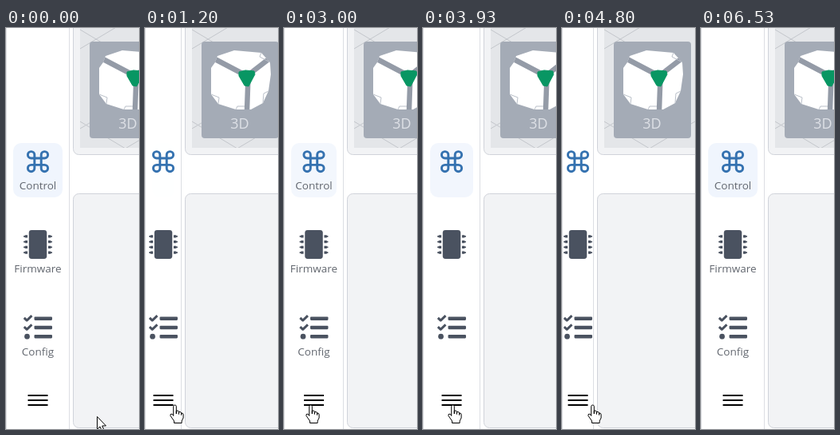
Write an HTML page that moves like this. It is 167 px wide and 502 px high and loops after 7.07 s.

```html
<!DOCTYPE html>
<html lang="en">
<head>
<meta charset="utf-8">
<title>Collapsing sidebar</title>
<style>
html, body { margin: 0; width: 100%; height: 100%; overflow: hidden; background: #fff; }
svg { display: block; width: 167px; height: 502px; }
text { font-family: "Open Sans", "Noto Sans", sans-serif; text-anchor: middle; }
#labels { font-size: 13.5px; fill: #62676f; }
.panel { fill: #f2f3f5; stroke: #d0d3da; }
.cursor { fill: #fff; stroke: #000; stroke-linejoin: round; }
</style>
</head>
<body>
<svg viewBox="0 0 167 502">
  <defs>
    <clipPath id="viewer"><rect x="13" y="-5" width="200" height="155"/></clipPath>
    <path id="cube" d="M45 35L66 28L100 31L111 43L112 58L109 79L102 94L87 102L68 102L46 95L37 83L37 50L42 43Z"/>
    <clipPath id="cubeClip"><use href="#cube"/></clipPath>
    <g id="pins">
      <path id="pin" d="M440 88h42q6 0 6 6v6h18q6 0 6 6v12q0 6-6 6h-18v6q0 6-6 6h-42z"/>
      <use href="#pin" y="96"/><use href="#pin" y="192"/><use href="#pin" y="288"/>
    </g>
  </defs>

  <path d="M.5 0V502" stroke="#e3e4e7"/>
  <rect id="highlight" x="9" y="144" height="68" rx="10" fill="#f0f5fd"/>

  <g id="menu">
    <g transform="translate(-16.8 150.400) scale(1.4)" fill="none" stroke="#3572b0" stroke-width="2.1">
      <path d="M18 3a3 3 0 0 0-3 3v12a3 3 0 1 0 3-3H6a3 3 0 1 0 3 3V6a3 3 0 1 0-3 3h12a3 3 0 0 0 0-6"/>
    </g>
    <g transform="translate(-18 253) scale(.0703)" fill="#4a5260">
      <rect x="96" width="320" height="512" rx="48"/>
      <use href="#pins"/>
      <use href="#pins" transform="matrix(-1 0 0 1 512 0)"/>
    </g>
    <g transform="translate(-18 357) scale(.0703)" fill="#4a5260">
      <path d="M11 84L59 129L148 44M11 244L59 289L148 204" fill="none" stroke="#4a5260" stroke-width="42" stroke-linejoin="round"/>
      <circle cx="64" cy="416" r="48"/>
      <rect x="192" y="64" width="320" height="64" rx="16"/>
      <rect x="192" y="224" width="320" height="64" rx="16"/>
      <rect x="192" y="384" width="320" height="64" rx="16"/>
    </g>
    <path d="M-12.500 460h25M-12.500 466h25M-12.500 472h25" stroke="#000" stroke-width="2"/>
    <g id="labels">
      <text y="202">Control</text>
      <text y="306">Firmware</text>
      <text y="410">Config</text>
    </g>
  </g>

  <g id="content">
    <path d="M-.5 0V502" stroke="#dcdee3"/>
    <rect class="panel" x="4.5" y="-20" width="220" height="178.500" rx="7"/>
    <rect class="panel" x="4.5" y="207.5" width="220" height="293" rx="7"/>
    <g clip-path="url(#viewer)">
      <rect x="13" y="-5" width="200" height="155" fill="#e4e6e9"/>
      <path d="M13 126L60 98M13 117L70 151M68 152L127 117M13 26L60-2M13 2L50 24" stroke="#c3c6cb" fill="none"/>
      <rect x="25" y="17" width="97" height="121" rx="4" fill="#a4abb6"/>
    </g>
    <use href="#cube" fill="#fff"/>
    <g clip-path="url(#cubeClip)" fill="none" stroke="#949ba7">
      <path d="M82 60L40 38M82 60L113 36M83.500 62L82 104" stroke-width="6.500"/>
      <path d="M37 83L47 87L46 95M68 102L70 98L79 98M100 31L98 36L111 43M109 79L103 82L102 94" stroke="#b9bfc8"/>
    </g>
    <path d="M72 55L80 53L91 54L92 58L84 73L79 72L72 60Z" fill="#089663" stroke="#089663" stroke-linejoin="round"/>
    <text x="73" y="126" font-size="18" fill="#dde0e6">3D</text>
  </g>

  <path id="arrow" class="cursor" d="M.5.5V16.500L4 13L6.700 19L9.300 18L6.800 12H11.500Z"/>
  <path id="hand" class="cursor" d="M-1.800 13.500V1.800a1.800 1.800 0 0 1 3.600 0V11V7q3.100-.4 3.200 1.500V11.500V8.500q2.900-.4 3.100 1.500V12.500V10q2.500-.2 2.500 2V16l-2 4V22.500H-1V20L-5.500 13.500q-.6-2.300 1.200-2.300T-1.800 13.500Z"/>
</svg>

<script>
const LOOP = 7070, STEP = 1000 / 15;
const SLIDE = 1100, OPEN = 80, CLOSED = 40;
const toggles = [
  { at: 690, open: false },
  { at: 2466, open: true },
  { at: 3850, open: false },
  { at: 5500, open: true },
];
// time, x, y of the pointer tip
const pointerPath = [
  [0, 114, 486], [300, 37, 472], [1450, 37, 472], [1750, 31, 472], [1960, 31, 472],
  [2000, 29, 472], [2700, 29, 472], [3300, 37, 472], [4400, 37, 472], [4700, 38, 472],
  [4990, 38, 472], [5130, 32, 472], [5320, 32, 472], [5470, 33, 470],
  [5733, 36, 449], [6000, 62, 405], [6400, 172, 340],
];

const byId = id => document.getElementById(id);
const clamp = v => Math.min(1, Math.max(0, v));
const easeOut = p => 1 - (1 - p) ** 3;
const place = (id, x, y = 0) => byId(id).setAttribute("transform", `translate(${x} ${y})`);
const show = (id, on) => byId(id).setAttribute("visibility", on ? "visible" : "hidden");

function sidebarAt(t) {
  const last = toggles.filter(s => s.at <= t).pop() || { at: -SLIDE, open: true };
  const age = t - last.at;
  const moved = easeOut(clamp(age / SLIDE));
  const [from, to] = last.open ? [CLOSED, OPEN] : [OPEN, CLOSED];
  return {
    width: Math.round(from + (to - from) * moved),
    open: last.open,
    glow: last.open ? clamp((age - 260) / 340) : 1 - clamp(age / 550),
  };
}

function pointerAt(t) {
  const i = pointerPath.findIndex(p => p[0] > t);
  if (i < 0) return pointerPath.at(-1).slice(1);
  const [t0, x0, y0] = pointerPath[i - 1], [t1, x1, y1] = pointerPath[i];
  const p = (t - t0) / (t1 - t0);
  return [Math.round(x0 + (x1 - x0) * p), Math.round(y0 + (y1 - y0) * p)];
}

function draw(now) {
  // The picture advances in fifteenths of a second
  const t = Math.floor((now % LOOP + 5) / STEP) * STEP;
  const { width, open, glow } = sidebarAt(t);
  place("menu", width / 2);
  place("content", width);
  show("labels", open);
  byId("highlight").setAttribute("width", width - 18);
  byId("highlight").setAttribute("opacity", glow);

  const [x, y] = pointerAt(t);
  const onButton = x < width && y > 440;
  show("hand", onButton);
  show("arrow", !onButton);
  place("hand", x + 0.5, y);
  place("arrow", x, y);
}

const start = performance.now();
function tick() {
  draw(performance.now() - start);
  requestAnimationFrame(tick);
}
tick();
</script>
</body>
</html>
```
